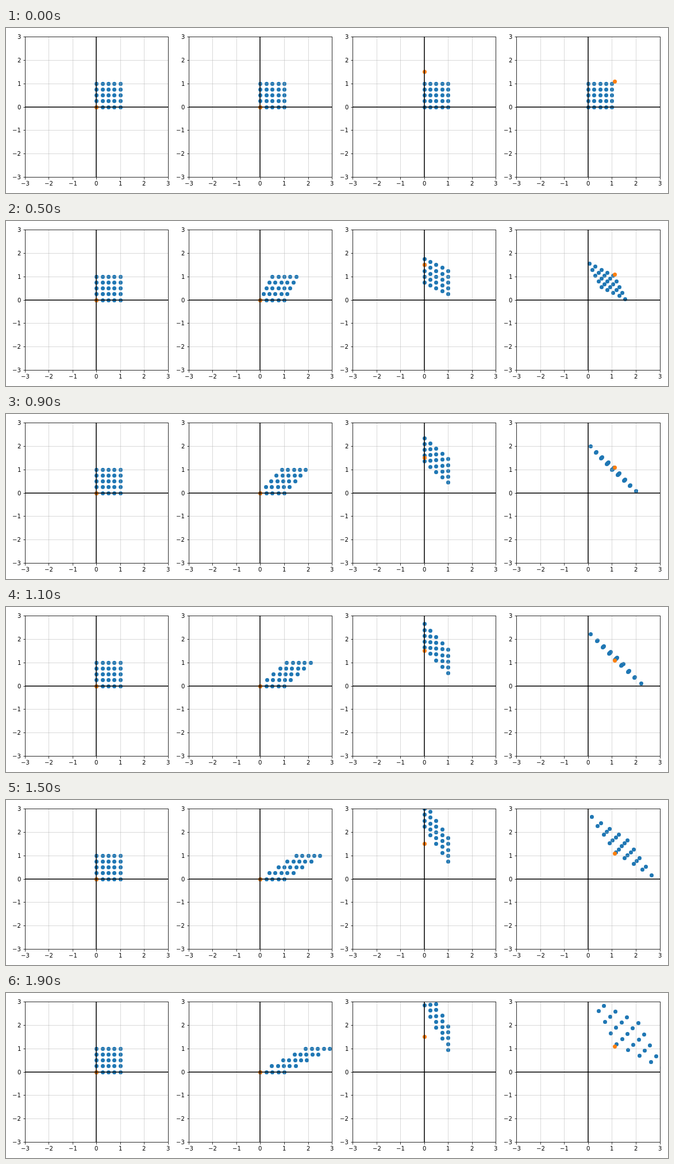
An HTML page with a canvas for the animation above (2000 ms loop, 1152 by 288 pixels).

```html
<!DOCTYPE html>
<html lang="en">
<head>
<meta charset="utf-8">
<title>Shear transforms</title>
<style>
  html, body { margin: 0; width: 100%; height: 100%; overflow: hidden; background: #fff; }
  canvas { display: block; }
</style>
</head>
<body>
<canvas id="stage" width="1152" height="288"></canvas>
<script>
const ctx = document.getElementById('stage').getContext('2d');
const UNIT_X = 41.55, UNIT_Y = 40.83, ORIGIN_Y = 137.6;
const TICKS = [-3, -2, -1, 0, 1, 2, 3];

// Each panel: the marked orange point and its map of (x, y) at strength s.
const panels = [
  { mark: [0, 0],     map: (x, y) => [x, y] },
  { mark: [0, 0],     map: (x, y, s) => [x + s * y, y] },
  { mark: [0, 1.5],   map: (x, y, s) => [x, y + s * (1.5 - x)] },
  { mark: [1.1, 1.1], map: (x, y, s) => [x + s * (1.1 - y), y + s * (1.1 - x)] },
];

const points = [];
for (let i = 0; i < 5; i++)
  for (let j = 0; j < 5; j++) points.push([i / 4, j / 4]);

function line(x1, y1, x2, y2, width, color) {
  ctx.lineWidth = width;
  ctx.strokeStyle = color;
  ctx.beginPath();
  ctx.moveTo(x1, y1);
  ctx.lineTo(x2, y2);
  ctx.stroke();
}

function drawPanel({ mark, map }, index, s) {
  const px = x => Math.round(157.2 + 285.22 * index + x * UNIT_X);
  const py = y => Math.round(ORIGIN_Y - y * UNIT_Y);
  const left = px(-3), right = px(3), top = py(3), bottom = py(-3);

  const dot = ([x, y], color) => {
    ctx.fillStyle = color;
    ctx.beginPath();
    ctx.arc(px(x) + 0.5, py(y) + 0.5, 3.5, 0, Math.PI * 2);
    ctx.fill();
  };

  ctx.save();
  ctx.beginPath();
  ctx.rect(left, top, right - left + 1, bottom - top + 1);
  ctx.clip();
  for (const [x, y] of points) dot(map(x, y, s), '#1f77b4');
  dot(mark, '#ff7f0e');
  for (const t of TICKS) {
    const x = px(t) + 0.5, y = py(t) + 0.5;
    line(x, top, x, bottom, 0.8, 'rgba(176,176,176,0.6)');
    line(left, y, right, y, 0.8, 'rgba(176,176,176,0.6)');
  }
  line(left, py(0), right, py(0), 1.5, '#000');
  line(px(0), top, px(0), bottom, 1.5, '#000');
  ctx.restore();

  ctx.fillStyle = '#000';
  for (const t of TICKS) {
    const x = px(t), y = py(t);
    const label = String(t).replace('-', '\u2212');
    const width = ctx.measureText(label).width;
    line(x + 0.5, bottom + 0.5, x + 0.5, bottom + 4.5, 0.8, '#000');
    line(left + 0.5, y + 0.5, left - 2.5, y + 0.5, 0.8, '#000');
    ctx.fillText(label, Math.round(x - width / 2), bottom + 15);
    ctx.fillText(label, Math.round(left - 7 - width), y + 4);
  }
  ctx.lineWidth = 0.8;
  ctx.strokeRect(left + 0.5, top + 0.5, right - left, bottom - top);
}

function draw() {
  const step = Math.floor(performance.now() % 2000 / 100);
  ctx.fillStyle = '#fff';
  ctx.fillRect(0, 0, 1152, 288);
  ctx.font = '10px "DejaVu Sans", sans-serif';
  panels.forEach((panel, i) => drawPanel(panel, i, step / 10));
  requestAnimationFrame(draw);
}
draw();
</script>
</body>
</html>
```
